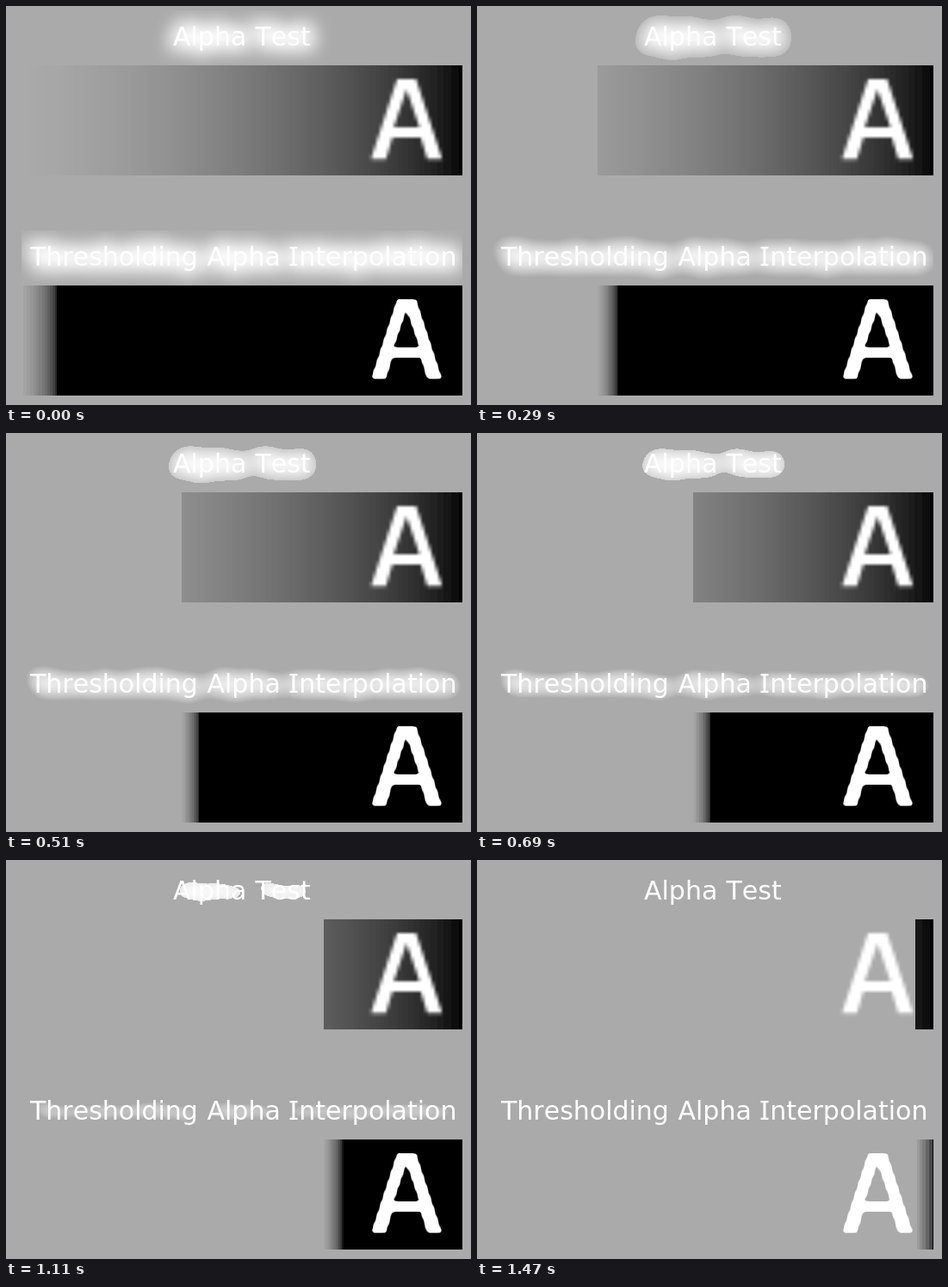
An HTML page with a canvas for the animation above (1.51 s loop, 540 by 464 pixels).

```html
<!DOCTYPE html>
<html lang="en">
<head>
<meta charset="utf-8">
<title>Alpha threshold wipe</title>
<style>
  html, body { margin: 0; width: 540px; height: 464px; overflow: hidden; background: #aaa; }
  canvas { display: block; }
</style>
</head>
<body>
<canvas id="stage" width="540" height="464"></canvas>
<script>
const W = 540, H = 464, BG = 170;
const LOOP = 1510, STEPS = 36;
const LEFT = 18, BAR_W = 512, BAR_H = 128, TITLE_H = 64;
const SOFT = .05;      // width of the interpolated edge

const ctx = document.getElementById('stage').getContext('2d');
const clamp = v => Math.min(1, Math.max(0, v));
const mix = (a, b, t) => a + (b - a) * t;
const quantize = v => Math.round(v * 255) / 255;

const stepAt = ms => Math.floor((ms + 4) * STEPS / LOOP);
const thresholdAt = step => Math.max(0, (step - .25) / 35.6);

// Opacity of the bar: halfway between linear and smoothstep
function rampAt(x) {
  const u = (x - LEFT) / BAR_W;
  return mix(u, u * u * (3 - 2 * u), .5);
}

// Blending happens in 8-bit linear light
const toLinear = v => ((v / 255 + .055) / 1.055) ** 2.4;
const toSrgb = l => 255 * (l <= .0031308 ? 12.92 * l : 1.055 * l ** (1 / 2.4) - .055);
const blend = (ink, alpha) => toSrgb(quantize(mix(toLinear(BG), ink, alpha)));
const BLACK = 0, WHITE = 1;

function layer(w, h, paint) {
  const c = document.createElement('canvas');
  c.width = w;
  c.height = h;
  paint(c.getContext('2d'));
  return c;
}

function alphaOf(canvas) {
  const { width, height } = canvas;
  const data = canvas.getContext('2d').getImageData(0, 0, width, height).data;
  return Float32Array.from({ length: width * height }, (_, i) => data[i * 4 + 3] / 255);
}

// The letter is painted small, then enlarged four times
const letter = layer(BAR_W / 4, BAR_H / 4, g => {
  // Mirrors [half width, y] points about the axis of the letter
  const symmetric = half => {
    const mirrored = half.map(([x, y]) => [-x, y]).reverse();
    [...half, ...mirrored].forEach(([x, y], i) => g[i ? 'lineTo' : 'moveTo'](x, y));
    g.closePath();
  };
  g.scale(.25, .25);
  g.translate(465.2 - LEFT, 0);
  symmetric([[11, 15.5], [41.3, 108.5], [24, 108.5], [16.5, 84], [0, 84]]);
  symmetric([[0, 28], [15, 72]]);
  g.fillStyle = '#fff';
  g.fill('evenodd');
});
const letterMask = alphaOf(layer(BAR_W, BAR_H, g => g.drawImage(letter, 0, 0, BAR_W, BAR_H)));

const WORDS = [['Alpha', 194, 46], ['Test', 289.5, 46], ['Thresholding', 28, 302],
  ['Alpha', 233.5, 302], ['I', 329.6, 302], ['nterpolation', 340.3, 302]];

function drawTitles(g, method) {
  g.font = '30px "DejaVu Sans", Verdana, sans-serif';
  g.fontKerning = 'none';
  g.fillStyle = g.strokeStyle = '#fff';
  for (const word of WORDS) g[method](...word);
}

const glyphs = layer(W, H, g => {
  drawTitles(g, 'fillText');
  // Serifs of the capital I
  for (const y of [280, 299.7]) g.fillRect(329.5, y, 9, 2.3);
});

const glow = alphaOf(layer(W, H, g => {
  const fat = layer(W, H, f => {
    f.lineWidth = 11;
    f.lineJoin = 'round';
    drawTitles(f, 'strokeText');
    drawTitles(f, 'fillText');
  });
  g.filter = 'blur(10px)';
  g.drawImage(fat, 0, 0);
}));

// Hard cut: a pixel is kept whole or dropped
const hardCut = {
  top: 5,
  glow: (a, limit) => a >= limit ? blend(WHITE, a) : BG,
  bar: (a, limit) => a >= limit ? blend(BLACK, a) : BG,
  cover: c => c
};

// Soft cut: opacity is remapped above the threshold
const softCut = {
  top: 261,
  glow: (a, limit) => blend(WHITE, clamp((Math.max(a, .015) - limit) / (1 - .6 * limit))),
  bar: (a, limit) => blend(BLACK, clamp((quantize(a) - limit) / Math.min(SOFT, 1 - limit))),
  cover: c => clamp((c - .5) * 4 + .5)
};

const image = ctx.createImageData(W, H);
for (let i = 0; i < W * H; i++) {
  put(i, BG);
  image.data[i * 4 + 3] = 255;
}

function put(i, v) {
  image.data.fill(Math.round(v), i * 4, i * 4 + 3);
}

function drawPanel(panel, limit) {
  for (let x = 0; x < BAR_W; x++) {
    const shade = panel.bar(rampAt(x + LEFT), limit);
    const column = panel.top * W + LEFT + x;
    for (let y = 0; y < TITLE_H; y++) {
      const i = column + y * W;
      put(i, panel.glow(glow[i], limit));
    }
    for (let y = 0; y < BAR_H; y++) {
      const cover = panel.cover(letterMask[y * BAR_W + x]);
      put(column + (TITLE_H + y) * W, mix(shade, 255, cover));
    }
  }
}

let shown = -1;

function render(ms) {
  const step = stepAt(ms % LOOP);
  if (step === shown) return;
  shown = step;
  for (const panel of [hardCut, softCut]) drawPanel(panel, thresholdAt(step));
  ctx.putImageData(image, 0, 0);
  ctx.drawImage(glyphs, 0, 0);
}

const start = performance.now();
function loop() {
  render(performance.now() - start);
  requestAnimationFrame(loop);
}
loop();
</script>
</body>
</html>
```
